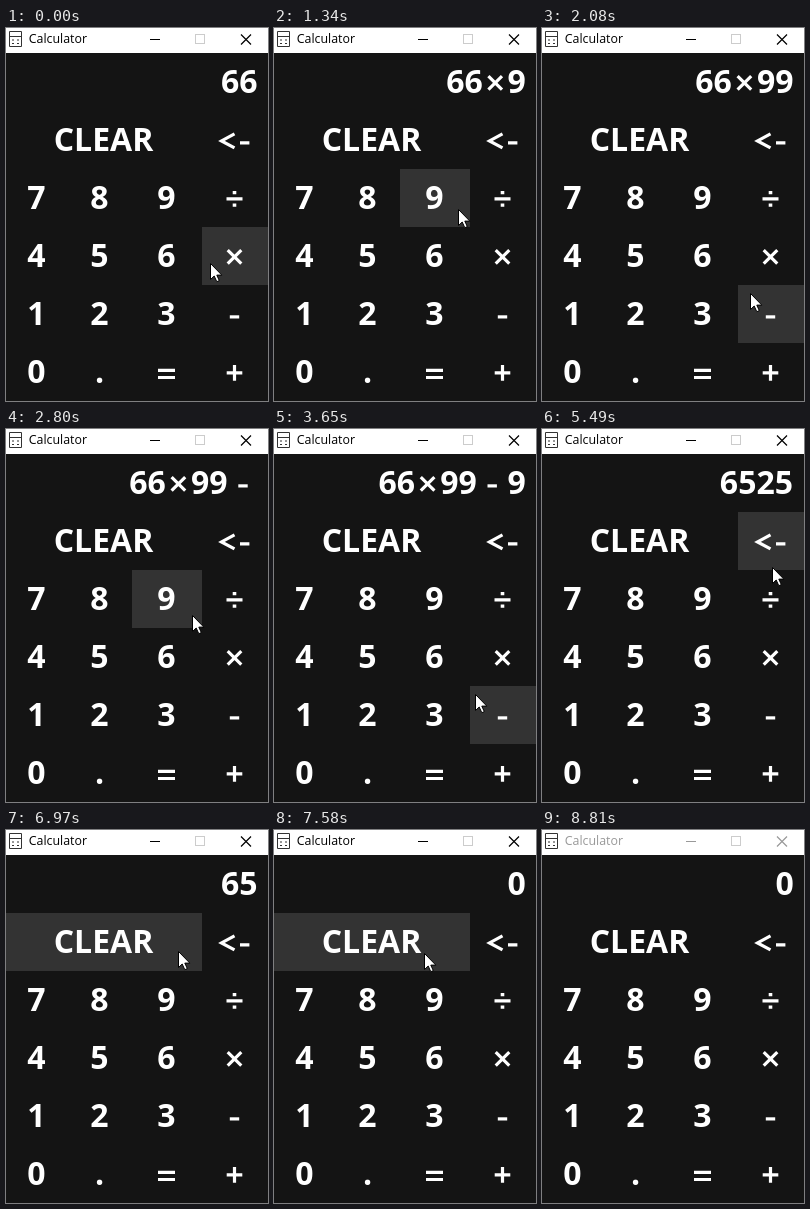
Write an HTML page that moves like this. It is 262 by 373 pixels and loops after 8910 ms.

```html
<!DOCTYPE html>
<html lang="en">
<head>
<meta charset="utf-8">
<title>Calculator</title>
<style>
  html, body { margin: 0; width: 100%; height: 100%; overflow: hidden; background: #141414; }
  svg { display: block; width: 262px; height: 373px; }
  .label { font: 700 32px "Open Sans", "Noto Sans", sans-serif; fill: #fff; text-anchor: middle; }
  .title { font: 12.4px "Open Sans", "Noto Sans", sans-serif; }
  .sign { fill: none; stroke: #fff; stroke-width: 3.2; }
  #bar { --ink: #000; --faint: #ccc; }
  #bar.inactive { --ink: #999; }
</style>
</head>
<body>
<svg viewBox="0 0 262 373">
  <rect width="262" height="373" fill="#141414"/>
  <g id="bar">
    <rect width="262" height="25" fill="#fff"/>
    <g fill="none" stroke="#333">
      <path d="M3.5 3.5h12v15h-12zM3.5 8.5h12"/>
      <path d="M6 12h2m3 0h2M6 15.5h2m3 0h2"/>
    </g>
    <text class="title" x="22.7" y="15" fill="var(--ink)">Calculator</text>
    <g fill="none" stroke="var(--ink)">
      <path d="M144 11.5h10"/>
      <rect x="189.5" y="6.5" width="9" height="9" stroke="var(--faint)"/>
      <path d="M235 6.5l10 10m0-10l-10 10" stroke-width="1.2"/>
    </g>
  </g>
  <rect id="hover" height="58"/>
  <g id="keys"></g>
  <g id="display"></g>
  <path id="cursor" d="M.5.5v16l3.7-3.5 2.6 5.7 2.5-1.1-2.5-5.5h5z" fill="#fff" stroke="#000"/>
</svg>
<script>
const LOOP = 8910;
const INACTIVE_AT = 8810;
const STEP = 120;
const QUICK = 120, SLOW = 250;
const ROW_HEIGHT = 58;
const $ = id => document.getElementById(id);

// Operator strokes, centred on the origin
const signs = {
  '×': 'M-6.8-6.8L6.8 6.8M6.8-6.8L-6.8 6.8',
  '÷': 'M-8 0h16M-1.8-6.3h3.6M-1.8 6.3h3.6',
  '-': 'M-4.7 2h9.4',
  '=': 'M-8.5-2.6h17M-8.5 4.6h17',
  '+': 'M-7.8 0h15.6M0-7.8v15.6',
  '<-': 'M0-7L-13 0L0 7M5.5 2h9.4'
};

function glyph(text, x, baseline) {
  const sign = signs[text.trim()];
  return sign
    ? `<path class="sign" d="${sign}" transform="translate(${x} ${baseline - 10.5})"/>`
    : `<text class="label" x="${x}" y="${baseline}">${text}</text>`;
}

const columns = [0, 62, 126, 196, 262];
const makeKey = (text, row, from, to = from + 1) => ({
  text, left: columns[from], right: columns[to], top: 83 + ROW_HEIGHT * row
});
const keys = [
  makeKey('CLEAR', 0, 0, 3), makeKey('<-', 0, 3),
  ...['789÷', '456×', '123-', '0.=+'].flatMap((line, i) =>
    [...line].map((text, col) => makeKey(text, i + 1, col)))
];
$('keys').innerHTML = keys
  .map(k => glyph(k.text, (k.left + k.right - 1) / 2, k.top + 40.4)).join('');

const keyAt = ({ x, y }) => keys.find(k =>
  x >= k.left && x < k.right && y >= k.top && y < k.top + ROW_HEIGHT);

const home = { x: 204, y: 235 };
const moves = [
  { at: 610, steps: 4, x: 184, y: 181 },
  { at: 1960, steps: 3, x: 211, y: 275 },
  { at: 2560, steps: 4, x: 184, y: 180 },
  { at: 3650, steps: 1, x: 201, y: 265 },
  { at: 3770, steps: 3, x: 203, y: 332 },
  { at: 4260, steps: 4, x: 180, y: 341 },
  { at: 5130, steps: 6, x: 236, y: 113 },
  { at: 6970, steps: 2, x: 150, y: 123 },
  { at: 8200, steps: 4, x: 270, y: 400 }
];

const clicks = [
  { up: 490, hold: SLOW }, { up: 1340, hold: SLOW }, { up: 1710, hold: QUICK },
  { up: 2440, hold: QUICK }, { up: 3280, hold: QUICK }, { up: 4880, hold: QUICK },
  { up: 6100, hold: SLOW }, { up: 6600, hold: QUICK }, { up: 7580, hold: QUICK }
];

const easeOut = p => 1 - (1 - p) ** 2;

// The pointer advances in discrete steps along each eased move
function pointerAt(t) {
  let { x, y } = home;
  for (const move of moves) {
    if (t < move.at) break;
    const step = Math.floor((t - move.at) / STEP) + 1;
    const p = easeOut(Math.min(1, step / move.steps));
    x += (move.x - x) * p;
    y += (move.y - y) * p;
  }
  return { x: Math.round(x), y: Math.round(y) };
}

const evaluate = text => text.split(' - ')
  .map(term => term.split('×').reduce((a, b) => a * b))
  .reduce((a, b) => a - b);

function press(text, key) {
  switch (key) {
    case 'CLEAR': return '0';
    case '<-': return text.slice(0, -1);
    case '=': return String(evaluate(text));
    case '-': return text + ' - ';
    default: return text + key;
  }
}

const readoutAt = t => clicks
  .filter(click => click.up <= t)
  .reduce((text, click) => press(text, keyAt(pointerAt(click.up)).text), '66');

function readoutMarkup(text) {
  let right = 252;
  return text.match(/\d+|×| - /g).reverse().map(token => {
    const width = token === '×' ? 24 : token === ' - ' ? 30 : 18.8 * token.length;
    right -= width;
    return glyph(token, right + width / 2, 65.4);
  }).join('');
}

let shown;
function draw(t) {
  const pointer = pointerAt(t);
  $('cursor').setAttribute('transform', `translate(${pointer.x} ${pointer.y})`);

  const key = keyAt(pointer);
  const pressed = clicks.some(({ up, hold }) => t >= up - hold && t < up);
  const hover = $('hover');
  hover.setAttribute('x', key ? key.left : 0);
  hover.setAttribute('y', key ? key.top : 0);
  hover.setAttribute('width', key ? key.right - key.left : 0);
  hover.setAttribute('fill', pressed ? '#444' : '#333');

  const text = readoutAt(t);
  if (text !== shown) $('display').innerHTML = readoutMarkup(shown = text);

  $('bar').classList.toggle('inactive', t >= INACTIVE_AT);
}

let start;
function tick(now) {
  start ??= now;
  draw((now - start) % LOOP);
  requestAnimationFrame(tick);
}
draw(0);
requestAnimationFrame(tick);
</script>
</body>
</html>
```
